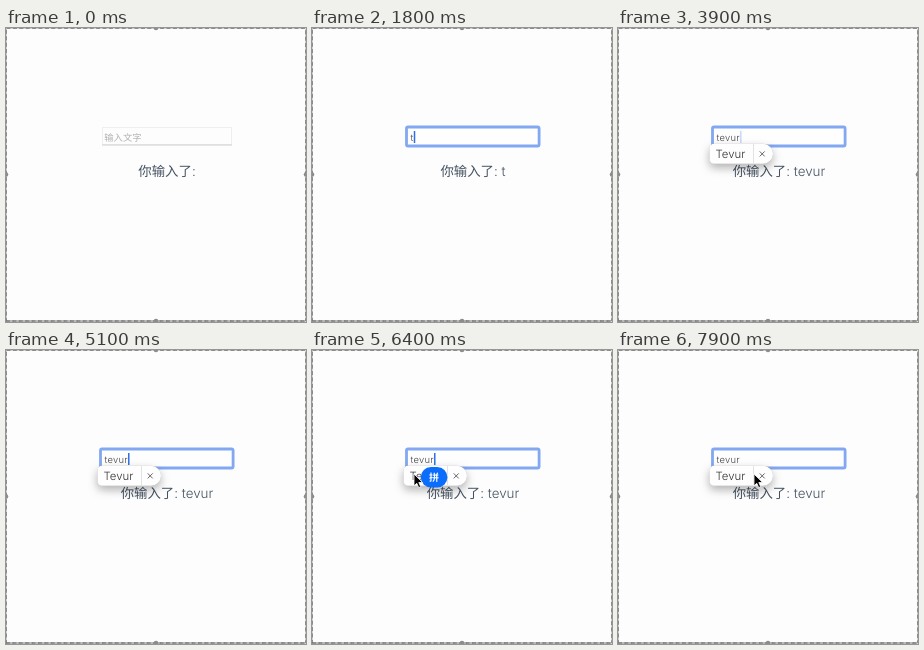
An HTML page for the animation above (8 s loop, 300 px wide and 294 px high).

```html
<!DOCTYPE html>
<html lang="zh-CN">
<head>
<meta charset="utf-8">
<title>输入文字</title>
<style>
  html, body { margin: 0; width: 100%; height: 100%; overflow: hidden; background: #fdfdfd; }
  svg { display: block; width: 300px; height: 294px; }
  text {
    font-family: Inter, "Noto Sans CJK SC", "Noto Sans CJK", sans-serif;
    font-weight: 350; white-space: pre; text-rendering: geometricPrecision;
  }
  #frame path { fill: none; }
  #popup { filter: drop-shadow(0 4px 5px rgba(0, 0, 0, .25)) drop-shadow(0 0 .5px rgba(0, 0, 0, .25)); }
</style>
</head>
<body>
<svg viewBox="0 0 300 294">
  <rect width="300" height="294" fill="#fdfdfd"/>
  <g id="frame">
    <path d="M.5 .5H299.5V293H.5Z" stroke="#d2d2d2"/>
    <path d="M.5 .5H299.5V293H.5Z" stroke="#8c8c8c" stroke-dasharray="4 2.4"/>
    <path d="M0 293H300" stroke="#777" stroke-width="1.4" stroke-dasharray="4 2.4"/>
    <g fill="#8c8c8c">
      <circle cx="150" cy="0" r="2.3"/><circle cx="150" cy="293" r="2.3"/>
      <circle cx="0" cy="146.5" r="2.3"/><circle cx="300" cy="146.5" r="2.3"/>
    </g>
  </g>

  <g id="field">
    <rect x="96.5" y="99.5" width="129" height="17" fill="#fdfdfd" stroke="#efefef"/>
    <path d="M96 117H226" stroke="#d0d0d0"/>
  </g>
  <rect id="ring" x="94.5" y="99" width="132.6" height="19" rx="1.5" fill="#fefefe" stroke="#82a8f2" stroke-width="2.8"/>
  <text id="hint" x="98.3" y="112.8" font-size="9.3" fill="#b0b0b0">输入文字</text>
  <text id="typed" x="98.5" y="113" font-size="9.4" letter-spacing=".25" fill="#444"></text>
  <rect id="caret" y="103" width="1.5" height="12" fill="#2f6fe4"/>
  <text id="echo" x="161" y="147.8" font-size="13.4" text-anchor="middle" fill="#445262"></text>

  <g id="popup">
    <path d="M96 115.8H145A10 10 0 0 1 145 135.8H96A4.5 4.5 0 0 1 91.5 131.3V120.3A4.5 4.5 0 0 1 96 115.8Z" fill="#fefefe"/>
    <path d="M135.5 116V135.5" stroke="#e2e2e2"/>
    <path d="M141.7 123.4L146.7 128.4M146.7 123.4L141.7 128.4" stroke="#666"/>
    <text x="97.5" y="129.8" font-size="11.4" fill="#333">Tevur</text>
  </g>
  <g id="badge">
    <rect x="108.8" y="117" width="26.6" height="20.4" rx="10.2" fill="#0a6dfb"/>
    <text x="122" y="130.9" font-size="10" style="font-weight: 700" text-anchor="middle" fill="#fff">拼</text>
  </g>
  <path id="cursor" d="M0 0V11.8L2.8 9.3L4.7 13.6L6.7 12.7L4.8 8.5H8.6Z" fill="#000" stroke="#fff" stroke-width=".8"/>
</svg>
<script>
  const LOOP = 8000, STEP = 100, WORD = "tevur", FOCUS = 700, BLINK = 1050;
  const [ring, field, hint, typed, caret, echo, popup, badge, cursor] =
    ["ring", "field", "hint", "typed", "caret", "echo", "popup", "badge", "cursor"]
      .map(id => document.getElementById(id));

  const keyTimes = [1700, 2000, 2500, 2700, 3000];

  // Pointer stops: time, x, y
  const visits = [
    [[100, 152, 84], [600, 126, 106], [700, 126, 106], [900, 172, 123]],
    [[5400, 155, 81], [6300, 102, 124], [6400, 102, 124], [7100, 187, 148], [7900, 136, 124]]
  ];

  const ramp = (t, from, to) => Math.min(1, Math.max(0, (t - from) / (to - from)));
  const ease = k => k * k * (3 - 2 * k);
  const show = (el, alpha) => el.setAttribute("opacity", +alpha);

  // The blink restarts with each key press.
  function caretAlpha(t) {
    const last = [1000, ...keyTimes].filter(k => k <= t).pop();
    if (!last) return 0;
    const p = (t - last) % BLINK;
    return Math.max(1 - ramp(p, 400, 650), ramp(p, 850, BLINK));
  }

  function pointer(t) {
    const stops = visits.find(v => t >= v[0][0] && t <= v[v.length - 1][0]);
    if (!stops) return null;
    const i = stops.findIndex((s, n) => n && s[0] >= t);
    const [t0, x0, y0] = stops[i - 1], [t1, x1, y1] = stops[i];
    const k = ease(ramp(t, t0, t1));
    return [x0 + (x1 - x0) * k, y0 + (y1 - y0) * k];
  }

  function draw(t) {
    const word = WORD.slice(0, keyTimes.filter(k => k <= t).length);
    const focused = t >= FOCUS;
    show(ring, focused);
    show(field, !focused);
    show(hint, !word);
    typed.textContent = word;
    echo.textContent = word ? "你输入了: " + word : "你输入了:";
    caret.setAttribute("x", 98.7 + (word ? typed.getComputedTextLength() : 0));
    show(caret, caretAlpha(t));
    show(popup, ramp(t, 3300, 3600));
    show(badge, ramp(t, 6200, 6400) - ramp(t, 6900, 7100));

    const tip = pointer(t);
    show(cursor, !!tip);
    if (tip) cursor.setAttribute("transform", `translate(${tip})`);
  }

  const start = performance.now();
  function tick() {
    const t = (performance.now() - start) % LOOP;
    draw(Math.floor(t / STEP) * STEP);
    requestAnimationFrame(tick);
  }
  tick();
</script>
</body>
</html>
```
